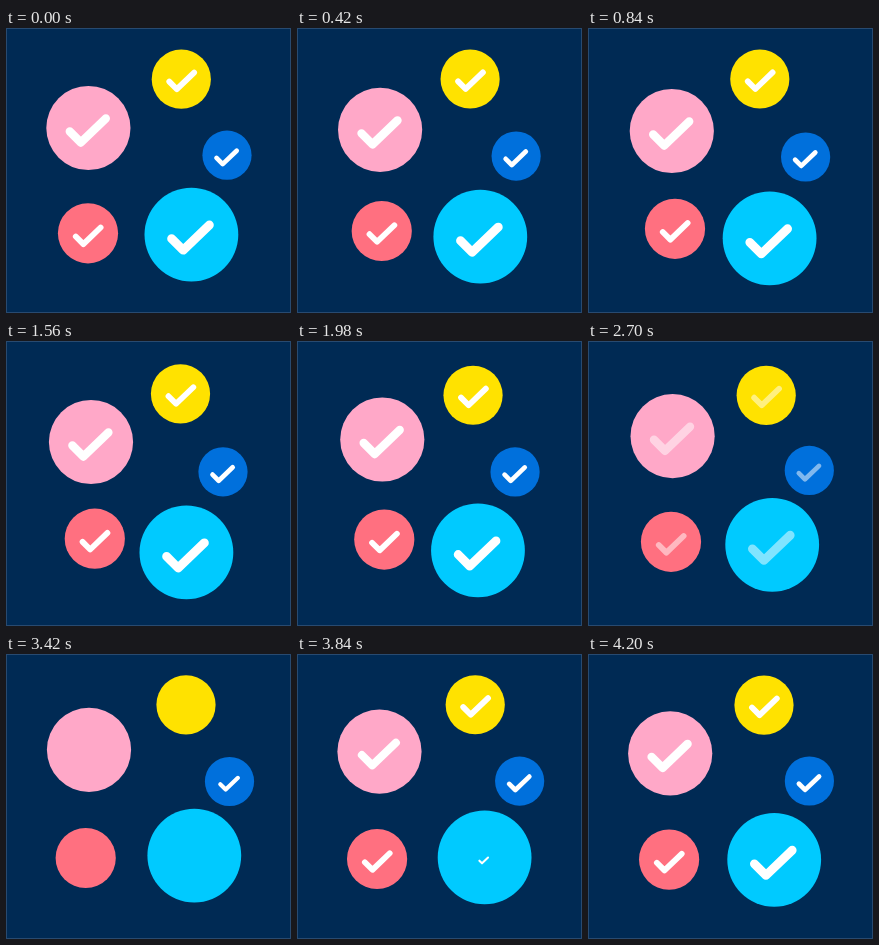
Recreate the animation shown at these times as an HTML page. Size 285 by 285 pixels, loop 4.26 s.

```html
<!DOCTYPE html>
<html lang="en">
<head>
<meta charset="utf-8">
<title>Floating checks</title>
<style>
  html, body { margin: 0; width: 100%; height: 100%; overflow: hidden; background: #002a54; }
  svg { display: block; width: 100vw; height: 100vh; }
  path { fill: none; stroke: #fff; stroke-width: 8.4; stroke-linecap: round; stroke-linejoin: round; }
  rect { fill: none; stroke: #284a70; }
</style>
</head>
<body>
<svg id="stage" viewBox="0 0 285 285"></svg>
<script>
const LOOP = 4260, STEP = 60;
const KEYS = [0, 840, 1560, 2340, 2700, 3420, 4200];
const FADE = [2520, 2880], POP = 240;

// r: radius, mark: offset of the check, size: its scale, pop: time it returns, x/y: path at KEYS
const balls = [
  { r: 42.1, fill: '#ffa8c8', mark: [-0.6, 2.5], size: 1, pop: 3690,
    x: [82.4, 83.8, 85, 85.3, 84.6, 83, 82.2], y: [100, 103, 101, 96.3, 95.2, 95.8, 99.4] },
  { r: 29.6, fill: '#ffe200', mark: [0.4, 1.7], size: 0.69, pop: 3430,
    x: [175.3, 171.8, 174.5, 177.3, 178.2, 180, 176], y: [51.2, 51, 52.8, 55.2, 54.3, 50.8, 51.1] },
  { r: 24.6, fill: '#0070dc', mark: [-0.4, 2.2], size: 0.56, pop: 3300,
    x: [221, 217.6, 217, 219.4, 221.3, 223.5, 221.4], y: [127.2, 129, 130.8, 130.6, 129.4, 127.5, 127] },
  { r: 30.1, fill: '#ff7080', mark: [0.2, 2.5], size: 0.69, pop: 3560,
    x: [82, 87, 88.8, 85.3, 83, 79.7, 81.1], y: [205.3, 200.8, 197.7, 199.8, 200.8, 204, 205.6] },
  { r: 46.9, fill: '#00caff', mark: [-0.9, 3], size: 1.05, pop: 3820,
    x: [185.4, 181.6, 180.4, 182, 184.2, 188.3, 186.2], y: [206.6, 210.3, 211.4, 207, 203.8, 201.6, 205.8] }
];

const stage = document.getElementById('stage');
const clamp = v => Math.min(1, Math.max(0, v));
const easeOut = p => 1 - (1 - p) ** 3;

function add(parent, tag, attrs = {}) {
  const el = document.createElementNS('http://www.w3.org/2000/svg', tag);
  for (const key in attrs) el.setAttribute(key, attrs[key]);
  return parent.appendChild(el);
}

// Smooth closed curve through the values at KEYS
function along(values, t) {
  const n = KEYS.length;
  const time = i => KEYS[(i + n) % n] + LOOP * Math.floor(i / n);
  const value = i => values[(i + n) % n];
  const slope = i => (value(i + 1) - value(i - 1)) / (time(i + 1) - time(i - 1));
  let i = n - 1;
  while (KEYS[i] > t) i--;
  const span = time(i + 1) - time(i);
  const u = (t - time(i)) / span, v = 1 - u;
  return v * v * (1 + 2 * u) * value(i) + u * u * (1 + 2 * v) * value(i + 1)
    + span * u * v * (v * slope(i) - u * slope(i + 1));
}

add(stage, 'rect', { x: 0.5, y: 0.5, width: 284, height: 284 });
for (const ball of balls) {
  ball.group = add(stage, 'g');
  add(ball.group, 'circle', { r: ball.r, fill: ball.fill });
  ball.check = add(ball.group, 'path', { d: 'M-18 1L-7 12L18-12' });
}

function draw(t) {
  const fade = 1 - clamp((t - FADE[0]) / (FADE[1] - FADE[0]));
  for (const ball of balls) {
    const back = t >= ball.pop;
    const grow = t < FADE[1] ? 1 : easeOut(clamp((t - ball.pop) / POP));
    ball.group.setAttribute('transform', `translate(${along(ball.x, t)} ${along(ball.y, t)})`);
    ball.check.setAttribute('transform', `translate(${ball.mark}) scale(${grow * ball.size})`);
    ball.check.setAttribute('opacity', back ? 1 : fade);
  }
}

const start = performance.now();
function tick() {
  const t = (performance.now() - start) % LOOP;
  draw(Math.floor(t / STEP) * STEP);
  requestAnimationFrame(tick);
}
tick();
</script>
</body>
</html>
```
